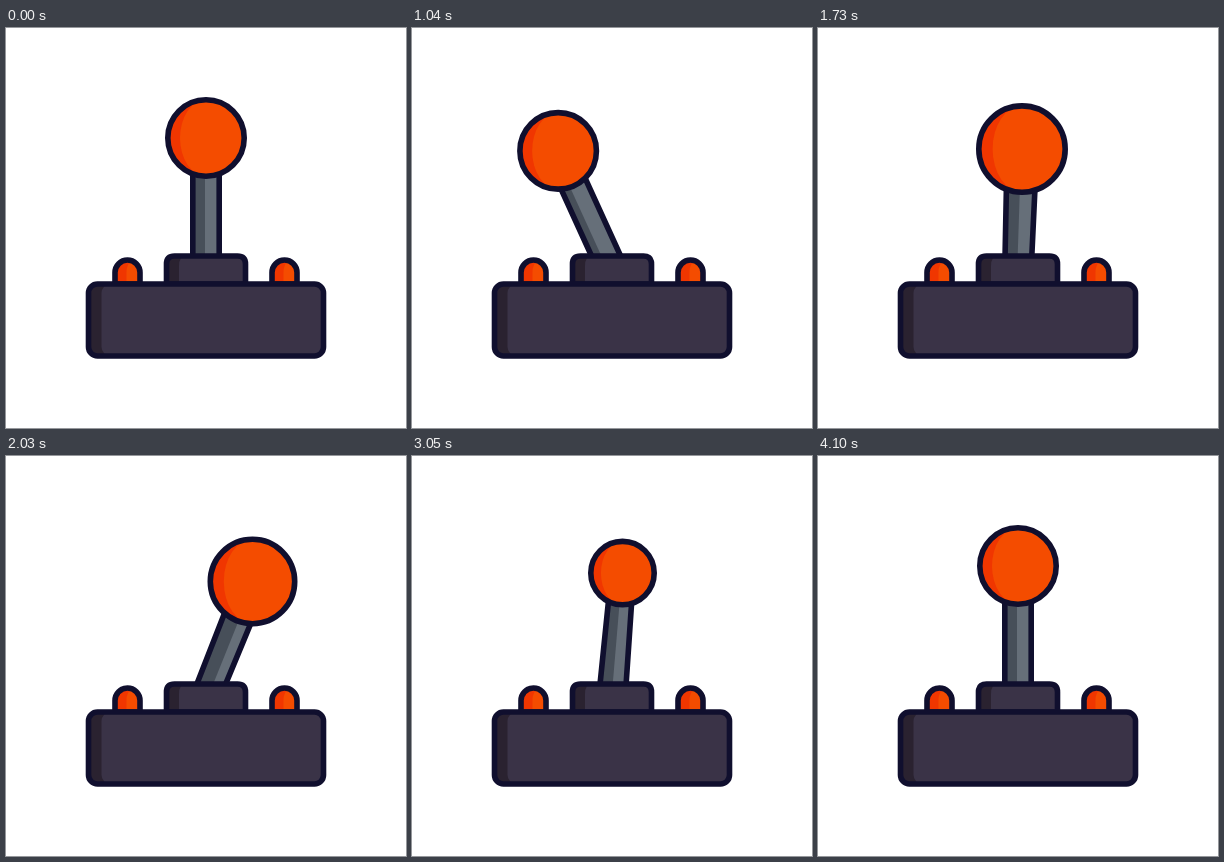
Animation, 400 px wide and 400 px high, one loop 4160 ms. Source, as an HTML page:

```html
<!DOCTYPE html>
<html lang="en">
<head>
<meta charset="utf-8">
<title>Joystick</title>
<style>
  html, body { margin: 0; width: 100%; height: 100%; overflow: hidden; background: #fff; }
  svg { display: block; width: 100vw; height: 100vh; }
  .line { fill: none; stroke: #100f2e; stroke-width: 5.6; stroke-linejoin: round; }
  .dark { fill: #2a2230; }
  .body { fill: #3a3347; }
  .red { fill: #f03600; }
  .orange { fill: #f44c00; }
  .steel { fill: #474f59; }
  .silver { fill: #666f79; }
</style>
</head>
<body>
<svg viewBox="0 0 400 400">
  <defs>
    <g id="button">
      <path class="red" d="M-12.5 256V244.500a12.500 12.500 0 0 1 25 0V256z"/>
      <path class="orange" d="M-1 256V244.500Q-1 236 4 233Q12.500 236 12.500 244.500V256z"/>
      <path class="line" d="M-12.500 256V244.500a12.500 12.500 0 0 1 25 0V256z"/>
    </g>
  </defs>

  <path id="shaft" class="steel"/>
  <path id="shine" class="silver"/>
  <path id="edge" class="line"/>

  <g id="ball">
    <circle id="shade" class="red"/>
    <path id="glow" class="orange"/>
    <circle id="rim" class="line"/>
  </g>

  <use href="#button" x="121.500"/>
  <use href="#button" x="278.500"/>

  <path class="dark" d="M160.500 256V236q0-8 8-8h63q8 0 8 8v20z"/>
  <path class="body" d="M173 256V238q0-10 7-10h51.500q8 0 8 8v20z"/>
  <path class="line" d="M160.500 256V236q0-8 8-8h63q8 0 8 8v20z"/>

  <rect class="dark" x="82.500" y="256" width="235" height="72" rx="9"/>
  <rect class="body" x="95.500" y="256" width="222" height="72" rx="9"/>
  <rect class="line" x="82.500" y="256" width="235" height="72" rx="9"/>
</svg>
<script>
const LOOP = 4160, START = 500, STEP = 30, RELEASE = 3050;
const PIVOT = { x: 200, y: 241 };

// time, sideways offset, projected stick length, ball radius
const keys = [
  [START, 0, 131, 41],
  [1000, -54, 130, 41],
  [1430, -40.5, 125.2, 44.5],
  [1710, 1, 120, 46],
  [2030, 46.5, 124.5, 45],
  [2270, 56, 127, 41],
  [2510, 51, 126.3, 36],
  [2780, 33, 125, 34.3],
  [RELEASE, 10.5, 124.4, 34.5]
];

const $ = id => document.getElementById(id);
const set = (id, attrs) => {
  for (const name in attrs) $(id).setAttribute(name, attrs[name]);
};

// Slope that keeps the curve free of overshoot
function slope(i, c) {
  if (i === 0 || i === keys.length - 1) return 0;
  const rate = j => (keys[j + 1][c] - keys[j][c]) / (keys[j + 1][0] - keys[j][0]);
  const a = rate(i - 1), b = rate(i);
  return a * b <= 0 ? 0 : 2 * a * b / (a + b);
}

function pose(t) {
  if (t <= START) return keys[0].slice(1);
  if (t >= RELEASE) {
    // The stick springs back from its rear position
    const age = t - RELEASE;
    const s = Math.cos(age * Math.PI / 300) * Math.exp(-age / 230);
    return [10.5 * s, 131 - 6.6 * Math.abs(s), 41 - 6.5 * s];
  }
  const i = keys.findIndex(k => k[0] > t) - 1;
  const from = keys[i], to = keys[i + 1];
  const span = to[0] - from[0], u = (t - from[0]) / span, v = 1 - u;
  return [1, 2, 3].map(c =>
    from[c] * (1 + 2 * u) * v * v + to[c] * u * u * (3 - 2 * u) +
    span * u * v * (v * slope(i, c) - u * slope(i + 1, c)));
}

function draw(t) {
  const [x, length, outer] = pose(t);
  const y = -Math.sqrt(length * length - x * x);
  const r = outer - 2.8;
  const low = 13.2, high = 13.2 * outer / 41, split = -1 + x * 0.06;

  // Point on the stick: side is measured across it, along from pivot to ball
  const at = (side, along) =>
    `${PIVOT.x + x * along - y / length * side} ${PIVOT.y + y * along + x / length * side}`;
  const strip = (a, b, c, d) => `M${at(a, 0)}L${at(b, 1)}L${at(c, 1)}L${at(d, 0)}z`;

  const outline = strip(-low, -high, high, low);
  set('shaft', { d: outline });
  set('shine', { d: strip(split, split, high, low) });
  set('edge', { d: outline });
  set('ball', { transform: `translate(${PIVOT.x + x} ${PIVOT.y + y})` });
  set('shade', { r });
  set('rim', { r });
  set('glow', { d: `M0 ${-r}A${r} ${r} 0 0 1 0 ${r}A${r * 0.68} ${r} 0 0 1 0 ${-r}z` });
}

const origin = performance.now();
function tick() {
  const t = Math.max(0, performance.now() - origin) % LOOP;
  draw(START + Math.floor((t - START) / STEP) * STEP);
  requestAnimationFrame(tick);
}
tick();
</script>
</body>
</html>
```
